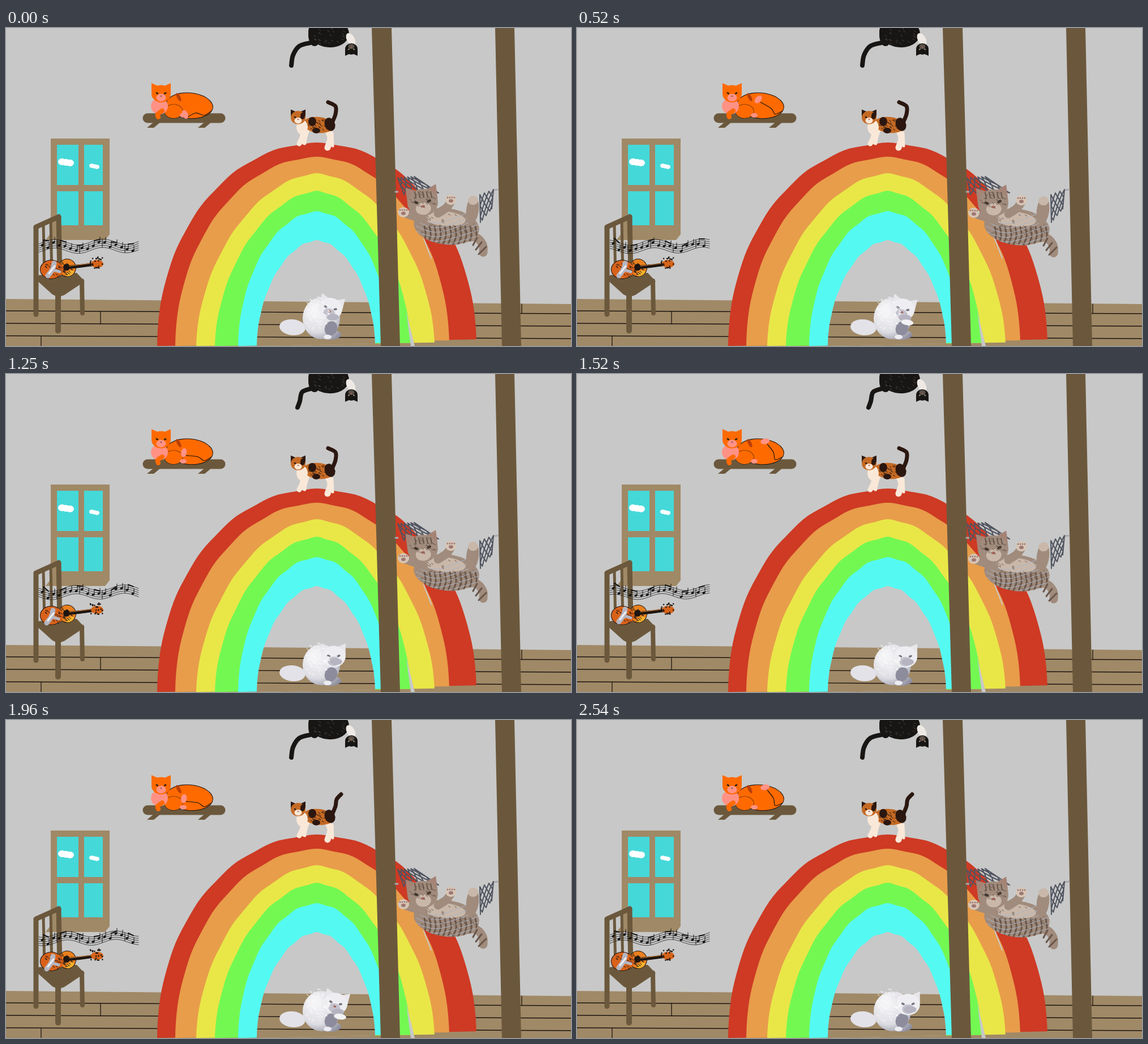
An HTML page with a canvas that plays this animation: 998 by 561 pixels, repeating every 2.59 s.

```html
<!DOCTYPE html>
<html lang="en">
<head>
<meta charset="utf-8">
<title>Cat room</title>
<style>
html, body { margin: 0; width: 100%; height: 100%; overflow: hidden; background: #c8c8c8; }
canvas { display: block; width: 100%; height: 100%; }
</style>
</head>
<body>
<canvas width="998" height="561"></canvas>
<script>
const ctx = document.querySelector('canvas').getContext('2d');
const LOOP = 2590, FLOOR = 561, WALL = '#c8c8c8', WOOD = '#6b583c', TAN = '#a08966', INK = '#1c1512';

const random = seed => Math.abs(Math.sin(seed * 12.9898) * 43758.5453) % 1;
const parse = text => text.split(' ').map(p => p.split(',').map(Number));

function fill(color, path) {
  ctx.fillStyle = color;
  ctx.fill(path);
}
function stroke(color, width, path) {
  ctx.strokeStyle = color;
  ctx.lineWidth = width;
  ctx.stroke(path);
}
function facet(color, text) {
  const path = new Path2D();
  parse(text).forEach(p => path.lineTo(...p));
  fill(color, path);
}
// Open smooth curve through every point
function line(color, width, text) {
  const pts = parse(text), path = new Path2D();
  const at = i => pts[Math.max(0, Math.min(pts.length - 1, i))];
  path.moveTo(...pts[0]);
  for (let i = 0; i < pts.length - 1; i++) {
    const [a, b, c, d] = [at(i - 1), at(i), at(i + 1), at(i + 2)];
    path.bezierCurveTo(b[0] + (c[0] - a[0]) / 6, b[1] + (c[1] - a[1]) / 6,
      c[0] - (d[0] - b[0]) / 6, c[1] - (d[1] - b[1]) / 6, ...c);
  }
  stroke(color, width, path);
}
function oval(color, x, y, rx, ry, turn = 0, outline = 0) {
  const path = new Path2D();
  path.ellipse(x, y, rx, ry, turn, 0, 7);
  if (outline) stroke(INK, outline * 2, path);
  fill(color, path);
  return path;
}
function group(x, y, draw, size = 1, turn = 0) {
  ctx.save();
  ctx.translate(x, y);
  ctx.rotate(turn);
  ctx.scale(size, size);
  draw();
  ctx.restore();
}
function inside(path, draw) {
  ctx.save();
  ctx.clip(path);
  draw();
  ctx.restore();
}
// Short random hairs scattered over an oval
function hairs(color, count, x, y, rx, ry) {
  const path = new Path2D();
  for (let i = 0; i < count; i++) {
    const angle = random(i + x) * 7, reach = Math.sqrt(random(i + y));
    const hx = x + Math.cos(angle) * rx * reach, hy = y + Math.sin(angle) * ry * reach;
    path.moveTo(hx, hy);
    path.lineTo(hx + 3, hy + 2);
  }
  stroke(color, 1, path);
}
function face(x, y, size, fur, ears, muzzle, eyes, turn = 0) {
  group(x, y, () => {
    for (const side of [-1, 1])
      facet(ears, `${side},-1.1 ${side},-.1 ${side * .2},-.75`);
    oval(fur, 0, 0, 1, .9);
    oval(muzzle, 0, .4, .5, .4);
    for (const side of [-.42, .42]) oval(eyes, side, -.05, .15, .09, -side);
    oval('#a8665c', 0, .25, .12, .08);
  }, size, turn);
}

function room() {
  facet(WALL, '0,0 998,0 998,561 0,561');
  facet(TAN, '0,478 998,487 998,561 0,561');
  for (let y = 499; y < FLOOR; y += 22) line(INK, 1.3, `0,${y} 998,${y + 5}`);
  line(INK, 1.3, '167,500 167,522');
  line(INK, 1.3, '62,544 62,561');
  line(INK, 1.3, '911,487 911,503');
  facet(TAN, '79,195 183,195 183,364 175,374 70,374 79,362');
  for (const [x, w] of [[90, 38], [138, 33]])
    for (const [y, h] of [[206, 71], [288, 60]]) {
      ctx.fillStyle = '#45d8d8';
      ctx.fillRect(x, y, w, h);
    }
  for (const [x, y, r] of [[106, 237, 7], [156, 244, 4.5]])
    for (const k of [-1, 0, 1]) oval('#fff', x + k * r, y + k, r, r * .85);
}

function chair() {
  line(WOOD, 9, '53,352 53,505');
  line(WOOD, 9, '53,351 93,333');
  line(WOOD, 9, '93,333 95,438');
  for (const x of [66, 79]) line(WOOD, 5, `${x},${375 - x * .44} ${x + 2},438`);
  line(WOOD, 8, '134,446 135,503');
  facet(WOOD, '52,443 82,470 92,475 103,471 139,447 125,432 58,436');
  line(WOOD, 10, '92,470 92,534');
}

// Half superellipse, rounder for larger powers
function arch(color, left, right, top, power) {
  const path = new Path2D(), middle = 549;
  for (let angle = Math.PI; angle >= 0; angle -= Math.PI / 90) {
    const c = Math.cos(angle), half = c < 0 ? middle - left : right - middle;
    path.lineTo(middle + Math.sign(c) * half * Math.abs(c) ** (2 / power),
      FLOOR - (FLOOR - top) * Math.max(0, Math.sin(angle)) ** (2 / power) + Math.sin(angle * 23));
  }
  if (color) fill(color, path);
  return path;
}

function rainbow() {
  arch('#ce3a24', 267, 831, 203, 2);
  arch('#e89d4a', 299, 783, 228, 1.95);
  arch('#e9e748', 336, 757, 257, 1.78);
  arch('#73f852', 369, 715, 288, 1.77);
  arch('#54faf2', 410, 680, 324, 1.88);
  inside(arch(null, 443, 652, 375, 1.83), room);
  facet(WALL, '707,500 722,561 715,561');
  line(WALL, 2, '738,372 751,406');
}

function shelf() {
  line(WOOD, 17, '250,159 379,159');
  for (const x of [249, 339]) facet(WOOD, `${x},176 ${x + 12},166 ${x + 24},166 ${x + 12},176`);
}

function orangeCat(pose) {
  const fur = '#ff6a00', pink = '#ff9285';
  oval(fur, 324, 137, 41, 22, .08, 1);
  oval(fur, 296, 147, 16, 12, 0, .6);
  oval('#b93f08', 305, 122, 3, 8, -.5);
  oval(pink, 271, 138, 15, 14);
  line(fur, 8, '276,146 268,152 269,157');
  face(274, 116, 17, fur, fur, pink, '#302010');
  oval(pink, 313, 154, 6, 4);
  const angle = (154 + 34 * pose) * Math.PI / 180;
  const x = 338 + 24 * Math.cos(angle), y = 142 + 24 * Math.sin(angle);
  line(INK, 1.2, `${x + 4},${y + 5} ${335 + pose * 4},${150 - pose * 4} 350,${154 - pose} 362,147`);
  oval(pink, x, y, 8, 5, angle + 1.6);
}

function blackCat(swing) {
  const fur = '#181614';
  line(fur, 8, `538,26 ${518 + swing * 5},32 ${507 + swing * 12},48 ${504 + swing * 11},${66 - swing * 7}`);
  oval(fur, 570, 8, 36, 26, .12);
  oval(fur, 545, 12, 11, 20);
  oval('#eee9e4', 609, 20, 7, 12, -.5);
  face(610, 37, 11, fur, fur, '#5b524a', '#a9a288', Math.PI);
  hairs('#484440', 25, 570, 12, 28, 18);
}

function calico(straight) {
  const dark = '#2b1710', rust = '#c46a25', cream = '#f9e8d8';
  line(dark, 7, '576,167 582,152 ' + (straight ? '584,140 592,131' : '582,138 569,131'));
  line(cream, 9, '524,172 524,190 518,204');
  line(cream, 7, '533,180 529,192 527,203');
  line(cream, 11, '568,180 573,194 568,211');
  line(cream, 5, '576,185 577,208');
  oval(rust, 552, 171, 28, 14, .1);
  oval(cream, 523, 175, 10, 13);
  oval(dark, 541, 165, 7, 8);
  oval(dark, 572, 170, 9, 12, -.4);
  oval(dark, 548, 181, 7, 5);
  hairs(dark, 30, 555, 171, 24, 11);
  face(516, 158, 13, rust, dark, cream, INK);
  oval(dark, 524, 155, 4, 6);
}

function whiteCat(t) {
  const turn = t / LOOP;
  const licking = t < 680 || (t > 1720 && t < 2250);
  const coat = ctx.createRadialGradient(545, 498, 8, 552, 508, 50);
  coat.addColorStop(0, '#f4f4f6');
  coat.addColorStop(.6, '#dcdce2');
  coat.addColorStop(1, '#8f8fa0');
  oval('#e2e2e8', 506, 528, 23, 14, .1);
  oval(coat, 557, 512 + turn * 2, 33, 37 - turn * 2);
  oval(coat, 572, 541, 20, 9);
  oval('#8d8c9c', 574, 530, 11, 13, .4);
  group(573 + 12 * turn, 495 + 7 * turn, () => {
    face(0, 0, 21, '#eeeef2', '#e8e6ea', '#c3c2cd', '#77747f', licking ? .25 : 0);
    oval('#b5b4c0', 4, licking ? 15 : 9, 11, 6);
    if (licking && t > 250) oval('#f2f2f5', 8, 23, 11, 5, .15);
  });
  hairs('#ffffff', 50, 548, 503, 22, 30);
  oval('#ededf1', 568, 545, 7, 4);
}

// Diamond mesh stretched over four corners
function net(corners, cols, rows) {
  const [a, b, c, d] = parse(corners), path = new Path2D();
  const at = (u, v) => [0, 1].map(k =>
    (a[k] * (1 - u) + b[k] * u) * (1 - v) + (d[k] * (1 - u) + c[k] * u) * v);
  for (let i = 0; i <= cols; i++)
    for (const side of [-.5, .5])
      for (let j = 0; j <= rows; j++) {
        const u = Math.max(0, Math.min(1, (i + j % 2 * side) / cols));
        path[j ? 'lineTo' : 'moveTo'](...at(u, j / rows));
      }
  stroke('#50545f', 2, path);
}

function paw(x, y) {
  oval('#d6c5b6', x, y, 10, 9);
  oval('#9e7770', x, y + 2, 4, 3);
  for (let k = -6; k <= 6; k += 4) oval('#9e7770', x + k, y - 4, 1.4, 1.6);
}

function hammock(swung) {
  const fur = '#a08b7c', pale = '#c9b8aa', stripe = '#69564a', sway = swung ? 1 : 0;
  line('#a9a9af', 3, '688,289 692,289');
  line('#a9a9af', 3, '861,286 869,285');
  net(`${692 - sway * 3},264 721,262 764,291 ${703 - sway * 8},294`, 5, 4);
  net('837,294 861,285 858,319 838,343', 3, 5);
  group(-sway, sway, () => {
    line(fur, 15, '808,371 829,369 842,382 843,396');
    for (let i = 0; i < 4; i++) line(stripe, 3, `${824 + i * 8},${362 + i * 8} ${820 + i * 5},${375 + i * 8}`);
    const body = oval(fur, 778, 350, 58, 32, .12);
    inside(body, () => {
      oval(pale, 774, 336, 38, 13, .1);
      for (let x = 738; x < 840; x += 9) line(stripe, 3, `${x - 5},388 ${x + 3},367 ${x + 1},350`);
      for (let i = 0; i < 6; i++)
        line('#aab4c5', 1, `724,${331 + i * 9} 765,${344 + i * 8} 840,${315 + i * 10}`);
    });
    hairs(stripe, 60, 778, 350, 50, 28);
    oval(fur, 824, 321, 11, 25, .12);
    oval(pale, 825, 304, 9, 8);
    line(fur, 15, '763,327 778,317 786,306');
    line(fur, 15, '738,338 720,332 703,326');
    paw(786, 303);
    paw(702, 325);
    face(736, 308, 27, fur, '#a58375', pale, '#40352f', -.12);
    for (let x = 722; x < 755; x += 7) line(stripe, 2, `${x},289 ${x + 2},299`);
    hairs(stripe, 30, 736, 302, 24, 15);
  });
}

function music(beat) {
  const wave = x => 386 - (x - 58) / 90 + 5 * Math.sin((x / 85 - beat) * 2 * Math.PI - 1.6);
  for (let row = -2; row <= 2; row++) {
    const path = new Path2D();
    for (let x = 58; x <= 234; x += 4) path.lineTo(x, wave(x) + row * 3.7);
    stroke('#222', .8, path);
  }
  for (let i = 0; i < 17; i++) {
    const x = 64 + i * 10, y = wave(x) + random(i) * 9 - 3;
    oval('#111', x, y, 2.6, 1.9, -.4);
    line('#111', 1, `${x + 2},${y} ${x + 2},${y - 9}`);
    if (i % 3 === 0) line('#111', 2, `${x + 2},${y - 9} ${x + 11},${wave(x + 10) - 7}`);
    if (i % 4 === 2) line('#111', 1, `${x + 6},${wave(x + 6) - 7} ${x + 6},${wave(x + 6) + 7}`);
  }
}

function guitar(strum) {
  oval('#d9621a', 80, 426, 19, 16, 0, 1);
  oval('#e9801f', 108, 423, 15, 15, 0, 1);
  oval('#d9621a', 88, 426, 14, 13);
  oval('#f7b32c', 113, 433, 8, 4, -.5);
  hairs(INK, 45, 88, 425, 27, 15);
  oval(INK, 107, 422, 6, 6);
  line(INK, 6, '108,422 130,420 153,417');
  line('#d98132', 1, '112,420 152,415');
  oval('#d5641a', 161, 416, 11, 7);
  for (let i = 0; i < 24; i++)
    oval(INK, 149 + random(i) * 23, 404 + random(i + 40 + strum) * 24, 1.3, 1.3);
  group(-2 * strum, 2 * strum, () => {
    line('#b6b6c0', 9, '74,437 82,426 85,415');
    line('#b6b6c0', 5, '84,427 95,430');
    line('#eeeef2', 3, '76,433 86,420');
  });
}

function draw(t) {
  const beat = t * 3 / LOOP % 1, flick = t * 5 / LOOP % 1;
  const swing = Math.round(Math.max(0, Math.min(2, 2.3 - Math.abs(t - 1300) / 320))) / 2;
  ctx.lineCap = ctx.lineJoin = 'round';
  room();
  chair();
  rainbow();
  shelf();
  orangeCat(Math.round(beat * 3.3));
  blackCat(swing);
  calico(flick > .5 && flick < .92);
  whiteCat(t);
  facet(WOOD, '646,0 681,0 696,561 662,561');
  facet(WOOD, '864,0 898,0 910,561 876,561');
  hammock(beat > .53);
  music(beat);
  guitar(beat > .2 && beat < .53 ? 1 : 0);
}

const start = performance.now();
function tick() {
  draw((performance.now() - start) % LOOP);
  requestAnimationFrame(tick);
}
tick();
</script>
</body>
</html>
```
